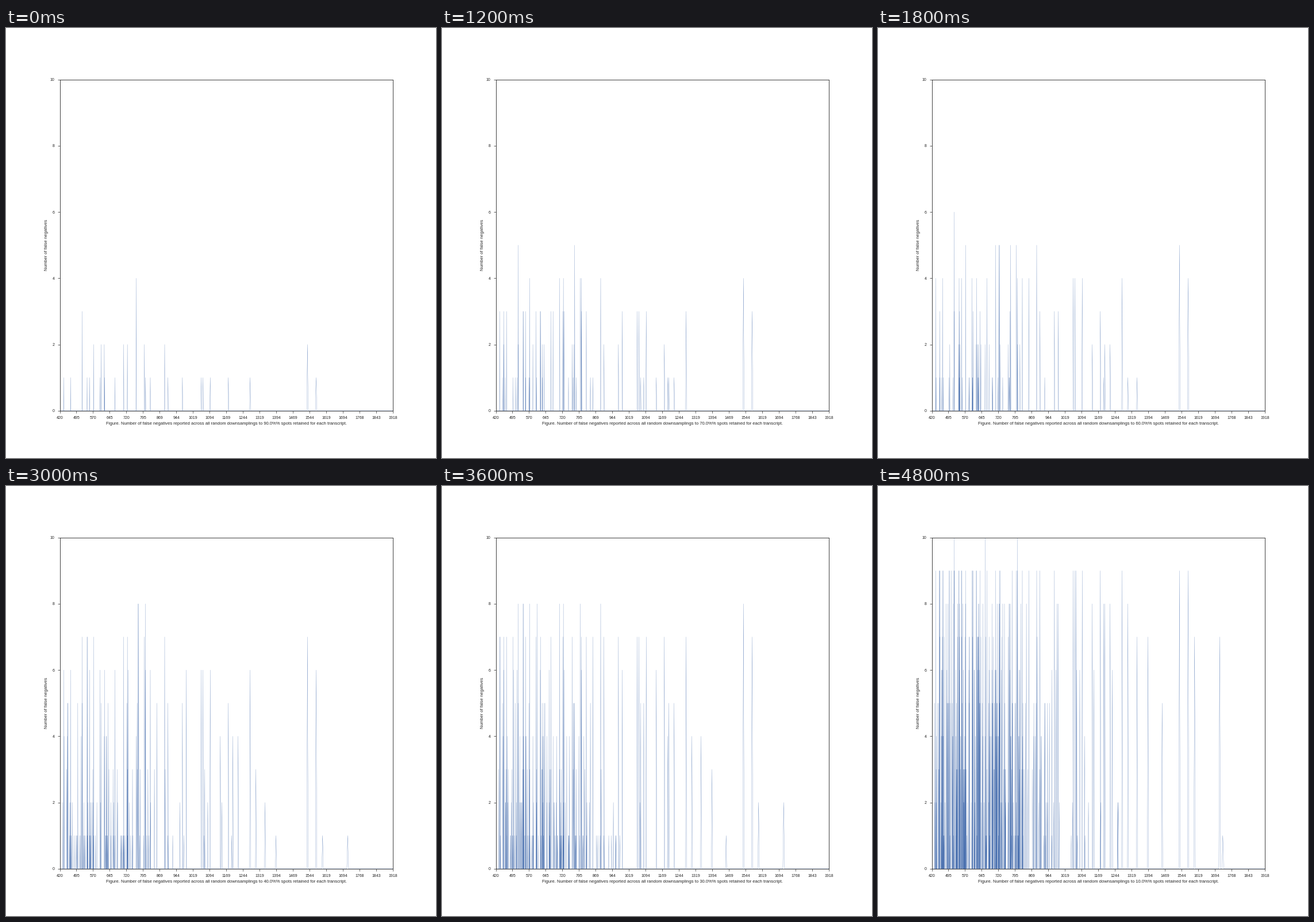
Recreate the animation shown at these times as a matplotlib script. Size 748 by 748 pixels, loop 5.4 s.

```python
import matplotlib.pyplot as plt
import numpy as np
from matplotlib.animation import FuncAnimation

SIZE, DPI = 748, 50
INK, BLUE = "0.15", "#4C72B0"
X_MIN, X_MAX, Y_MAX = 420.4, 1918.8, 10
RETAINED = np.arange(90, 0, -10)
LOST = 1 - RETAINED / 100

plt.rcParams.update({"font.family": "Liberation Sans", "text.color": INK,
                     "axes.labelcolor": INK, "axes.edgecolor": INK,
                     "xtick.color": INK, "ytick.color": INK})

# Prominent transcripts: stage position and resistance to spot loss.
PROMINENT = [
    (100, 1.1), (112, 1.0), (132, 0.6), (145, 0.9), (152, 0.75), (163, 1.1),
    (171, 1.0), (189, 0.9), (204.4, 0.7), (210.7, 0.7), (240.4, 0.7),
    (242.4, 0.95), (250.6, 1.1), (275.6, 0.7), (281.4, 1.2), (306.5, 1.2),
    (339.2, 0.9), (342.3, 0.9), (354.8, 0.9), (372.4, 1.6), (386.4, 1.2),
    (394.2, 1.9), (403.4, 2), (424.2, 0.9), (434.3, 2.6), (450.2, 2.8),
    (469.2, 3.8), (493.8, 6), (524, 0.75), (539, 0.9), (550.3, 4),
    (594, 4), (599.4, 20),
]


def miss_rate(resistance):
    """Chance of a false negative at every level; rises as spots are lost."""
    return LOST ** resistance


def make_spikes(n=310, seed=12):
    """Positions with a count per level, prominent ones plus a random crowd."""
    rng = np.random.default_rng(seed)
    spikes = [(x, np.round(10 * miss_rate(r))) for x, r in PROMINENT]
    crowd_x = 97.5 + 400 * rng.beta(1.2, 3.6, n)
    crowd_r = np.maximum(rng.lognormal(2.2, 1.0, n), 1.2)
    for x, r in zip(crowd_x, crowd_r):
        spikes.append((x, rng.binomial(10, miss_rate(r))))
    return sorted(spikes, key=lambda s: s[0])


def to_length(px):
    left, width = 0.125 * SIZE, 0.775 * SIZE
    return X_MIN + (px + 0.4 - left) / width * (X_MAX - X_MIN)


def outline(step):
    """Polyline that rises and falls once per missed transcript."""
    xs, ys = [X_MIN], [0]
    for x, counts in spikes:
        if counts[step]:
            # Long transcripts lie further apart, so their spikes are wider.
            foot = 0.2 + 1.3 * ((x - 93) / 500) ** 2
            xs += [to_length(x - foot), to_length(x), to_length(x + foot)]
            ys += [0, counts[step], 0]
    return xs + [X_MAX], ys + [0]


spikes = make_spikes()
fig, ax = plt.subplots(figsize=(SIZE / DPI, SIZE / DPI), dpi=DPI,
                       facecolor="white")
fig.subplots_adjust(left=0.125, right=0.9, bottom=0.11, top=0.88)
ax.set(xlim=(X_MIN, X_MAX), ylim=(0, Y_MAX))
ticks = np.linspace(X_MIN, X_MAX, 21)
ax.set_xticks(ticks, [str(int(t)) for t in ticks])
ax.set_yticks(range(0, Y_MAX + 1, 2))
ax.tick_params(length=6, width=1, pad=7, labelsize=10)
for spine in ax.spines.values():
    spine.set_linewidth(1.25)
ax.set_ylabel("Number of false negatives", fontsize=11)
caption = ax.set_xlabel("", fontsize=11)
line, = ax.plot([], [], color=BLUE, lw=0.4)


def draw(step):
    line.set_data(*outline(step))
    caption.set_text("Figure. Number of false negatives reported across all "
                     f"random downsamplings to {RETAINED[step]:.1f}%% spots "
                     "retained for each transcript.")
    return line, caption


anim = FuncAnimation(fig, draw, frames=len(RETAINED), interval=600,
                     init_func=lambda: draw(0), repeat=True, blit=False)
plt.show()
```
